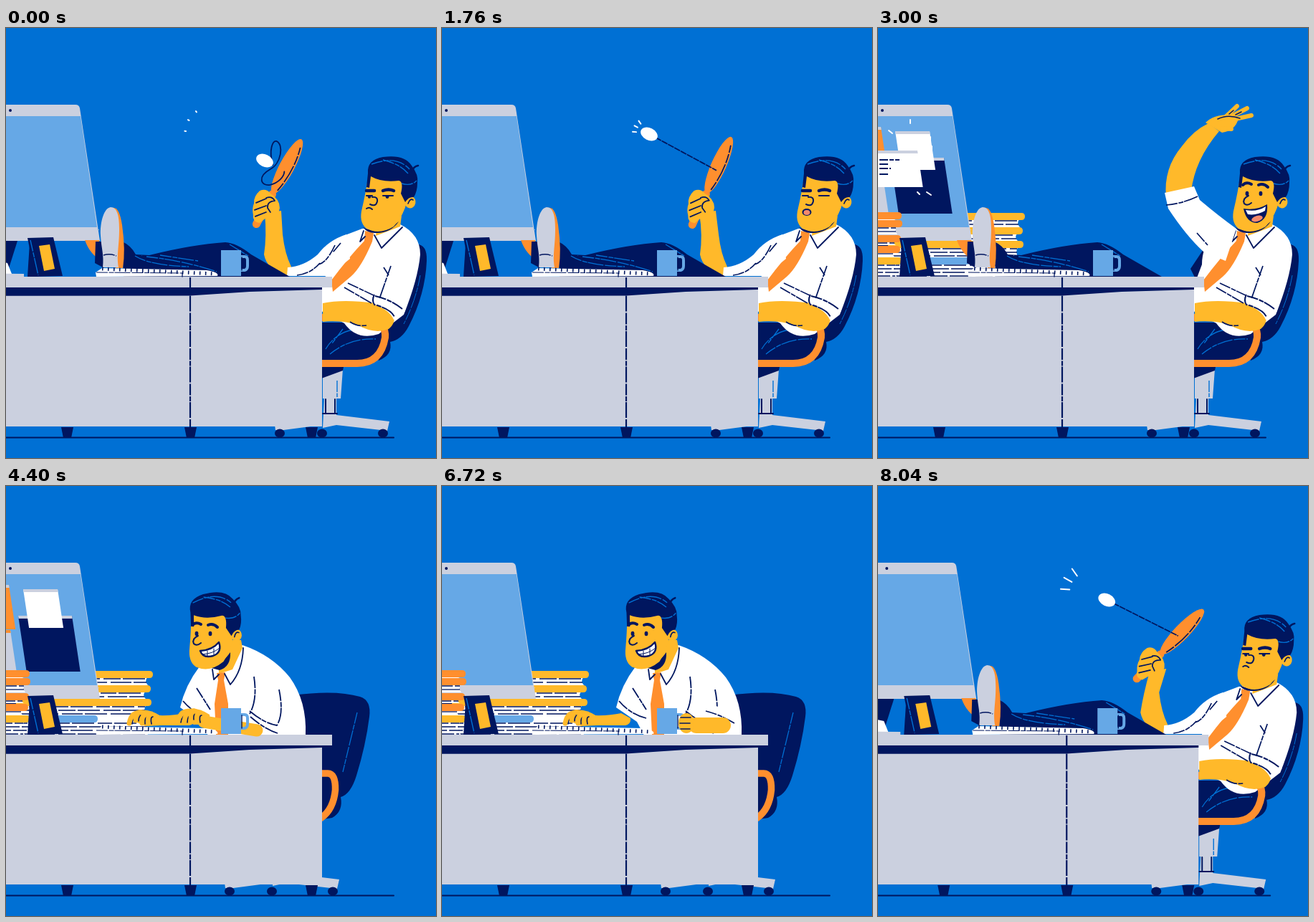
An HTML page with a canvas that plays this animation: 600 by 600 pixels, repeating every 8120 ms.

```html
<!DOCTYPE html>
<html lang="en">
<head>
<meta charset="utf-8">
<title>Office day</title>
<style>
html, body { margin: 0; width: 100%; height: 100%; overflow: hidden; background: #0070d4; }
canvas { position: absolute; left: 0; top: 0; width: 600px; height: 600px; filter: url(#rough); }
svg { position: absolute; left: 0; top: 0; width: 0; height: 0; }
</style>
</head>
<body>
<svg><filter id="rough" x="0" y="0" width="100%" height="100%" color-interpolation-filters="sRGB">
  <feTurbulence type="fractalNoise" baseFrequency="0.25" numOctaves="1" seed="4" result="n"/>
  <feDisplacementMap in="SourceGraphic" in2="n" scale="1.5" xChannelSelector="R" yChannelSelector="G"/>
</filter></svg>
<canvas id="c" width="600" height="600"></canvas>
<script>
const ctx = document.getElementById('c').getContext('2d');
const BLUE = '#0070d4', NAVY = '#00165f', GREY = '#cbd0df', SKY = '#66a8e6',
      ORANGE = '#ff8f2e', YELLOW = '#ffb92a', WHITE = '#ffffff', PINK = '#f58a6c';
const LOOP = 8120, STEP = 40, PAN = 800, LEAN = .14, SKETCH = [16, 1.5, 7, 1, 22, 2];

const lerp = (a, b, u) => a + (b - a) * u;
const span = (t, a, b) => Math.max(0, Math.min(1, (t - a) / (b - a)));
const easeOut = u => 1 - (1 - u) ** 3;
const easeIn = u => u * u;
const easeBoth = u => u < .5 ? 4 * u ** 3 : 1 - 4 * (1 - u) ** 3;
const smooth = u => u * u * (3 - 2 * u);

function fill(color, d) { ctx.fillStyle = color; ctx.fill(new Path2D(d)); }
function line(d, width = 2, color = NAVY, dash = []) {
  ctx.strokeStyle = color; ctx.lineWidth = width;
  ctx.lineCap = dash.length ? 'butt' : 'round'; ctx.lineJoin = 'round';
  ctx.setLineDash(dash); ctx.stroke(new Path2D(d)); ctx.setLineDash([]);
}
function oval(color, x, y, rx, ry = rx, turn = 0) {
  ctx.fillStyle = color; ctx.beginPath(); ctx.ellipse(x, y, rx, ry, turn, 0, 7); ctx.fill();
}
function at(x, y, draw, turn = 0, sx = 1, sy = 1) {
  ctx.save(); ctx.translate(x, y); ctx.rotate(turn); ctx.scale(sx, sy); draw(); ctx.restore();
}
function spin(x, y, turn, draw) {
  at(x, y, () => { ctx.translate(-x, -y); draw(); }, turn);
}
// Interpolates rows of [time, value, value...]
function keyed(u, rows) {
  let i = 0;
  while (i < rows.length - 2 && u > rows[i + 1][0]) i++;
  const a = rows[i], b = rows[i + 1], v = span(u, a[0], b[0]);
  return a.slice(1).map((n, j) => lerp(n, b[j + 1], v));
}

// ---------- desk and things on it ----------
function floor() { line('M-150 571.5 H541', 2); }

function desk() {
  fill(GREY, 'M-130 362 H441 V556 H-130z');
  fill(NAVY, 'M-130 361 L441 362 V365 L340 368 L257 373.5 L-130 374z');
  fill(GREY, 'M-140 347 H455 V362 H-140z');
  line('M257 348 V557', 2.2, NAVY, SKETCH);
  for (const x of [-95, 77, 249, 418]) fill(NAVY, `M${x} 557 h17 l-3 15 h-11z`);
}

function pile(books, t) {
  books.forEach(([x1, x2, y, gap, color], i) => {
    const land = 2640 - i * 80;
    if (t < land - 240) return;
    at(0, -(y + 40) * (1 - easeIn(span(t, land - 240, land))), () => {
      fill(WHITE, `M${x1} ${y + 9} H${x2 - 8} q-4 ${gap / 2 - 4} 1 ${gap - 9} H${x1}z`);
      for (let n = y + 11; n < y + gap; n += 5)
        line(`M${x1} ${n} H${x2 - 9}`, 1.3, NAVY, [19 + n % 11, 3, 31, 5]);
      fill(color, `M${x1} ${y} H${x2 - 5} q5 0 5 5 t-5 5 H${x1}z`);
    });
  });
}
const farPile = [[10, 205, 258, 20, YELLOW], [10, 202, 278, 19, YELLOW],
                 [10, 203, 297, 23, YELLOW], [10, 205, 320, 27, WHITE], [10, 128, 320, 10, SKY]];
const nearPile = [[-70, 33, 257, 11, ORANGE], [-70, 34, 268, 20, ORANGE], [-70, 32, 289, 14, ORANGE],
                  [-70, 31, 304, 16, ORANGE], [-70, 33, 320, 27, YELLOW]];

function pane(t, open, shut, x, y, w, h, color, bar = GREY) {
  if (t < open || t >= shut) return;
  const grow = easeOut(span(t, open, open + 120)), fold = 1 - span(t, shut - 160, shut);
  at(x + w / 2 * (1 - grow), y + h / 2 * (1 - grow), () => {
    ctx.transform(1, 0, .15, 1, 0, 0);
    ctx.fillStyle = color; ctx.fillRect(0, 0, w, h * fold);
    ctx.fillStyle = bar; ctx.fillRect(0, 0, w, 4);
  }, 0, grow, grow);
}

function monitor(t) {
  fill(NAVY, 'M-60 297 H16 L4 335 H-60z');
  fill(WHITE, 'M-25 322 L2 328 L8 343 H-25z');
  fill(GREY, 'M-80 342 L25 343 V347 H-80z');
  fill(GREY, 'M-120 107 H97 Q102 107 103 112 L131 297 H-120z');
  oval(NAVY, 6, 115, 2);
  const screen = 'M-114 123 H104 L127 278 H-114z';
  fill(SKY, screen);
  ctx.save();
  ctx.clip(new Path2D(screen));
  pane(t, 2560, 5280, -50, 201, 56, 56, GREY, ORANGE);
  pane(t, 2640, 6280, -50, 138, 54, 62, ORANGE);
  pane(t, 2720, 5760, 17, 181, 75, 78, NAVY);
  pane(t, 2800, 4640, 24, 144, 48, 54, WHITE);
  ctx.restore();
  pane(t, 2880, 3640, -50, 171, 105, 51, WHITE);
  if (t >= 2960 && t < 3480)
    line('M-20 184 H30 M-20 190 H14 M-20 196 H18 M-20 204 H14', 2, NAVY, [12, 2, 6, 2]);
  if (t >= 2880 && t < 3080)
    line('M45 128 v5 M15 143 l5 4 M73 152 v10 M75 165 v7 M55 229 l3 3 M68 229 l6 4', 2, WHITE);
}

function photo() {
  fill(NAVY, 'M33 300 L30 347 H45z');
  fill(NAVY, 'M30 293 L66 292 L79 346 L41 347z');
  line('M34 296 L45 345', 1.4, BLUE, SKETCH);
  fill(YELLOW, 'M46 304 L61 302 L68 336 L53 339z');
}

function keyboard() {
  fill(WHITE, 'M125 341 L134 335 L280 338 Q298 341 295 346 L126 347z');
  line('M134 336 L293 343', 5, NAVY, [1.6, 6.4]);
  line('M126 341 L246 342', 1, NAVY, SKETCH);
  line('M246 342 V347', 1.3);
}

function mug(x = 300, y = 310, turn = 0) {
  at(x, y, () => {
    line('M28 9 h5 q4 0 4 5 v8 q0 5 -4 6 h-5', 4, SKY);
    fill(SKY, 'M0 0 H28 V36 H0z');
    line('M29 10 V28', 1.4);
  }, turn);
}

// ---------- chair ----------
function base() {
  fill(GREY, 'M375 554 L440 545 V554 L387 561 H376z M442 484 L470 476 L467 517 H442z');
  fill(NAVY, 'M440 473 H471 L470 478 L440 489z');
  fill(GREY, 'M444 517 H461 V540 L535 549 L532 562 L461 554 L442 558z');
  line('M446 518 V538 M459 518 V538 M442 538 H462', 2);
  line('M462 492 V515', 1.4, BLUE, SKETCH);
  for (const x of [382, 441, 526]) oval(NAVY, x, 565.5, 7, 6);
}

function reclinedChair() {
  base();
  fill(NAVY, 'M570 302 Q588 300 587 325 Q585 372 562 416 Q552 435 536 438 Q540 456 520 464 L500 420z');
  line('M578 345 Q572 380 555 413', 1, BLUE, SKETCH);
}

function uprightChair() {
  at(-70, 0, base);
  fill(NAVY, 'M400 292 Q460 284 494 294 Q510 299 507 322 Q502 362 489 404 Q481 430 467 434 Q471 454 455 463 L430 467 V440 H400z');
  line('M490 316 L470 399', 1.3, BLUE, SKETCH);
  line('M430 401 H449 Q460 401 459.5 424 Q457 451 440 463', 9.5, ORANGE);
}

// ---------- man ----------
function features(mood) {
  if (mood === 'dull' || mood === 'sigh') {
    line('M503 227 L514 227 M526 227 Q534 224 541 227', 4.5);
    line('M503 234 H511 M526 234 H540', 2);
    if (mood === 'dull') { oval(NAVY, 507, 235.5, 2.2); oval(NAVY, 532, 235.5, 2.4); }
    line('M511 236 Q519 235 518 242 Q516 250 508 246', 2);
  } else {
    at(0, mood === 'grin' ? 6 : 0, () => {
      line('M509 219 Q514 214 521 218 M531 219 Q538 216 544 222', 4);
      oval(NAVY, 515, 231, 2.4, 3.2); oval(NAVY, 534, 231, 2.4, 3.2);
      line('M517 234 Q508 238 511 245 Q515 249 521 244', 2);
    });
  }
  if (mood === 'dull') line('M503 252 Q507 249 511 253', 2);
  if (mood === 'sigh') { oval(NAVY, 509, 257, 6.5, 5); oval(PINK, 509, 257.5, 4.5, 3.4); }
  if (mood === 'wow') {
    fill(NAVY, 'M510 252 Q528 255 543 246 Q545 267 529 272 Q514 272 510 252z');
    fill(WHITE, 'M513 254 Q529 257 541 249 L540 255 Q528 262 516 260z');
    oval(PINK, 529, 266, 8, 4, -.3);
  }
  if (mood === 'grin') {
    const grin = 'M520 261 Q537 260 546 249 Q551 263 538 268 Q524 272 520 261z';
    fill(WHITE, grin); line(grin, 2.4);
    line('M523 266 Q538 265 547 257 M530 261 V269 M539 258 V267', 1);
  }
}

function head(mood) {
  fill(YELLOW, 'M506 203 L553 208 L560 240 Q555 262 541 277 Q520 290 502 279 Q492 270 497 251 Q502 230 506 203z');
  oval(YELLOW, 564, 243, 7.5, 8.5, .2);
  line('M561 245 Q564 237 568 240', 1.6);
  fill(NAVY, 'M503 222 L505 203 Q503 184 526 180 Q556 176 566 192 Q576 205 574 216 Q574 228 569 236 Q562 235 557 243 L551 231 Q555 214 548 213 Q525 216 509 207 L507 223z');
  line('M566 200 Q569 193 575 192', 2.6);
  line('M510 190 Q545 177 563 197 M526 184 Q550 190 561 203 M552 217 Q565 221 573 213', 1.4, BLUE, SKETCH);
  // the grin keeps level while the skull leans
  spin(540, 195, mood === 'grin' ? LEAN : 0, () => features(mood));
}

function lowerArm() {
  fill(YELLOW, 'M442 384 Q470 378 515 384 L540 394 Q546 410 534 420 Q514 428 490 414 Q465 407 442 410z');
}

function recliner(t, mood) {
  const up = t >= 2560;
  reclinedChair();
  if (up) fill(NAVY, 'M456 306 L436 336 L442 348 H480z');
  fill(NAVY, 'M440 411 H520 Q522 440 510 465 H440z');
  line('M446 448 Q460 425 485 421 M452 455 Q480 432 516 434 M470 420 L455 440', 1.3, BLUE, SKETCH);
  fill(WHITE, 'M497 280 L550 274 Q578 288 578 316 Q575 350 555 400 L520 427 Q490 437 472 412 L440 395 V362 L452 330 Q452 305 468 291z');
  line('M440 404 L505 405 Q531 411 529 432 Q523 468 490 468 H440', 10, ORANGE);
  lowerArm();
  fill(WHITE, 'M513 371 L560 355 L557 395 Q550 405 541 407 Q535 393 512 385z');
  line('M514 372 Q510 380 514 386 Q537 392 542 403 M515 374 Q535 378 553 392', 2, NAVY, SKETCH);
  line('M477 356 L513 373 M472 362 L510 384', 1.6, NAVY, SKETCH);
  line('M537 332 L521 378 M527 334 L534 345 M480 410 Q490 417 503 415', 1.7, NAVY, SKETCH);
  fill(ORANGE, 'M501 283 L513 286 L511 298 Q496 334 481 347 L456 368 L454 352 Q478 320 500 297z');
  fill(YELLOW, 'M518 272 L552 262 L550 277 L516 290z');
  fill(NAVY, 'M498 278 Q526 290 548 270 Q537 286 517 286 Q505 287 498 278z');
  line('M499 283 L494 298 L501 291 M514 289 L524 307 L553 278', 1.8);
  head(mood);
  up ? raisedArm(t) : paddleArm(t);
}

function raisedArm(t) {
  const swing = -1.15 * (1 - easeOut(span(t, 2560, 2760)));
  const wave = t > 2760 ? Math.sin((t - 3000) / 75) * .09 : 0;
  spin(472, 300, swing, () => {
    fill(YELLOW, 'M402 236 Q398 196 424 165 Q440 143 461 133 L476 144 Q442 184 437 228z');
    spin(464, 138, wave, () => {
      fill(YELLOW, 'M457 132 Q468 121 490 121 L503 126 Q499 143 480 146z');
      line('M484 125 L501 109', 6, YELLOW);
      line('M492 124 L515 112', 6, YELLOW);
      line('M494 128 L521 122', 6, YELLOW);
      line('M480 140 L493 141', 6, YELLOW);
      line('M474 127 Q488 120 505 126 M490 120 L496 115 M499 121 L507 117', 1.6);
    });
    fill(WHITE, 'M500 280 Q475 262 449 240 L441 221 L400 230 L405 252 Q430 290 454 312 L485 325z');
    line('M402 247 Q425 245 446 235 M445 286 L460 303', 1.7, NAVY, SKETCH);
  });
}

function bat() {
  line('M0 29 L0 -18', 11, ORANGE);
  oval(ORANGE, 0, -62, 10.5, 43);
  line('M4 -26 Q12 -62 4 -94', 1.7, NAVY, [13, 2, 26, 2]);
}

function paddleArm(t) {
  const u = (((t + 160) % 480) + 480) % 480 / 480;
  const [tilt, gx, bx, by] = keyed(u, [
    [0, 24, 361, 289, 148], [1 / 6, 44, 375, 313, 159], [1 / 3, 28, 363, 361, 185],
    [.44, 16, 358, 371, 189], [.7, 19, 359, 315, 161], [1, 24, 361, 289, 148]]);
  const a = tilt * Math.PI / 180, gy = 248, sway = gx - 362;
  const ax = gx + 54 * Math.sin(a), ay = gy - 54 * Math.cos(a);

  if (u < .4) {
    const r1 = lerp(15, 35, u * 3), r2 = r1 + 1 + 9 * Math.sin(Math.min(1, u * 3) * Math.PI) + 4 * (1 - u * 2.5);
    for (const ang of [3.2, 3.65, 4.1]) {
      const c = Math.cos(ang), s = Math.sin(ang);
      line(`M${286 + c * r1} ${146 + s * r1} L${286 + c * r2} ${146 + s * r2}`, 2, WHITE);
    }
  }
  fill(YELLOW, `M${360 + sway} 258 L${383 + sway} 255 L386 288 Q389 315 398 333 L393 346 Q364 338 360 316 Q364 290 ${360 + sway} 258z`);
  fill(WHITE, 'M475 288 Q450 296 435 316 Q415 333 393 334 L392 346 H450 L480 322z');
  line('M459 303 Q448 327 436 330 M406 345 Q425 343 438 328 M467 300 L456 313', 1.7, NAVY, SKETCH);
  at(gx, gy, bat, a);
  at(gx, gy, () => {
    fill(YELLOW, 'M-9 -21 Q0 -25 6 -17 Q19 -9 19 3 L15 19 L0 17 L-9 24 Q-19 23 -18 13 Q-20 4 -17 -3 Q-18 -13 -9 -21z');
    line('M-14 -4 L0 -10 M-16 6 L0 0 M-15 15 L0 9 M0 -11 Q8 -14 12 -7 Q1 -6 2 3 L6 9', 1.7);
  }, (a - .47) * .5);

  const slack = span(105 - Math.hypot(bx - ax, by - ay), 0, 75);
  const loops = [[-16, -9], [-22, -31], [-16, -44], [-11, -43], [0, -39], [-4, -11], [-20, -3],
                 [-38, 7], [-34, 21], [-20, 19], [-8, 16], [0, 7], [0, 0]];
  const pts = loops.map(([x, y], i) =>
    [lerp(lerp(bx, ax, i / 12), ax + x, slack), lerp(lerp(by, ay, i / 12), ay + y, slack)].join(' '));
  line(`M${bx} ${by} L${pts[0]} C${pts.slice(1).join(' ')}`, 1.8, NAVY, slack ? [] : [9, 1]);
  oval(WHITE, bx, by, 12.5, 8.5, .45);
}

function legs() {
  fill(NAVY, 'M162 298 Q174 303 181 316 L200 317 Q260 302 306 299 Q322 300 342 316 L396 347 H164z');
  line('M180 318 Q200 331 255 333 M196 319 Q250 325 294 340 M215 317 L268 325 M312 302 L338 318', 1.3, BLUE, SKETCH);
  fill(ORANGE, 'M110 296 H130 L135 325 Q118 318 110 296z');
  fill(NAVY, 'M125 298 H134 L137 335 L124 328z');
  fill(ORANGE, 'M148 251 Q158 248 162 275 Q167 310 163 335 H153z');
  fill(GREY, 'M146 250 C137 251 131 270 132 290 C133 308 137 316 135 334 H157 C154 316 158 305 158 280 C158 262 155 250 146 250z');
  line('M136 317 Q145 314 154 318', 1.4, NAVY, SKETCH);
}

function sitter() {
  fill(WHITE, 'M270 252 Q250 278 243 309 L272 329 L282 348 H418 Q420 300 396 267 Q371 236 330 222z');
  line('M247 300 Q262 318 285 324 M266 282 L285 312 M346 266 Q351 298 340 318 M381 284 Q388 318 378 334 Q360 331 340 314', 1.8, NAVY, SKETCH);
  line('M341 322 Q362 340 379 345', 1.8, NAVY, SKETCH);
  fill(YELLOW, 'M296 215 H328 L330 226 L316 256 L297 262z');
  fill(NAVY, 'M276 251 Q296 256 313 232 Q314 252 298 257z');
  fill(ORANGE, 'M294 261 L306 260 L304 271 L310 304 V347 H293 L291 304 L296 271z');
  line('M288 256 L290 270 L297 263 M305 262 L313 277 Q330 258 331 226', 1.8);
  at(-249, -31, () => spin(540, 195, -LEAN, () => head('grin')));
}

function typingHand(x, y, beat) {
  at(x, y, () => {
    fill(YELLOW, 'M44 -2 Q26 -14 8 -9 L0 2 L22 12 L46 11z');
    for (let i = 0; i < 4; i++) {
      const dip = (beat + i * 2) % 3 ? 0 : -4;
      const d = `M${16 + i * 6} ${-5 + i} Q${4 + i * 7} ${-10 + dip} ${i * 9} ${8 + dip}`;
      line(d, 7, YELLOW);
      line(`M${4 + i * 9} ${9 + dip} Q${5 + i * 8} ${-1 + dip} ${15 + i * 6} ${-4 + i}`, 1.6);
    }
  });
}

function arms(t) {
  const beat = Math.floor(t / 80), reach = smooth(span(t, 6440, 6680)), sip = smooth(span(t, 6800, 7120));
  const busy = t < 6640 && t > 3360;
  fill(YELLOW, 'M250 317 Q228 322 196 319 L200 334 H256 Q264 332 263 324z');
  typingHand(172, 323, busy ? beat : 1);

  const hx = lerp(lerp(262, 341, reach), 306, sip), hy = lerp(lerp(326, 331, reach), 262, sip);
  const ex = lerp(350, 392, reach), ey = lerp(341, 334, reach);
  if (reach) {
    line(`M${ex - 14} ${ey - 16} L${ex + 10} ${ey - 6}`, 24 * reach, WHITE);
    line(`M${ex - 24} ${ey - 20} Q${ex - 4} ${ey - 15} ${ex + 16} ${ey - 3}`, 1.7, NAVY, SKETCH);
  }
  line(`M${hx + 14} ${hy + 3} L${ex} ${ey}`, lerp(17, 22, reach), YELLOW);
  if (reach < .5) typingHand(hx - 22, hy - 5, beat + 1);
  mug(300 + (hx - 341) * sip, 310 + (hy - 331) * sip, .55 * sip);
  if (reach >= .5) {
    oval(YELLOW, hx, hy, 11, 14);
    line(`M${hx - 8} ${hy - 8} h14 M${hx - 9} ${hy} h14 M${hx - 8} ${hy + 8} h13`, 1.6);
  }
}

// ---------- scenes ----------
function lounging(t) {
  const lift = easeIn(span(t, 3080, 3200));
  const mood = t >= 2440 ? 'wow' : t >= 1520 && t < 2080 ? 'sigh' : 'dull';
  floor();
  pile(farPile, t); monitor(t); pile(nearPile, t);
  at(-70 * lift + 3 * Math.sin(span(t, 3040, 3120) * Math.PI), 0, () => recliner(t, mood));
  at(40 * lift, 60 * lift, legs);
  desk(); photo(); keyboard(); mug();
  if (t >= 2560 && t < 2760) {
    const u = span(t, 2560, 2760);
    at(lerp(365, 425, u), lerp(248, -90, u), bat, .5 + 4 * u);
  }
}

function working(t) {
  const slide = 1 - easeOut(span(t, 3200, 3380));
  floor();
  pile(farPile, t); monitor(t); pile(nearPile, t);
  at(30 * slide, 0, uprightChair);
  at(110 * slide, 8 * slide, sitter);
  desk(); photo(); keyboard();
  if (slide > .3) mug(); else arms(t);
}

let shown = -1;
function frame(now) {
  const t = Math.floor(now % LOOP / STEP) * STEP;
  if (t !== shown) {
    shown = t;
    ctx.setTransform(1, 0, 0, 1, 0, 0);
    ctx.fillStyle = BLUE;
    ctx.fillRect(0, 0, 600, 600);
    const pan = PAN * easeBoth(span(t, 7480, LOOP));
    if (t < 3200) lounging(t);
    else at(-pan, 0, () => working(t));
    if (pan > 0) at(PAN - pan, 0, () => lounging(t - LOOP));
  }
  requestAnimationFrame(frame);
}
frame(0);
</script>
</body>
</html>
```
